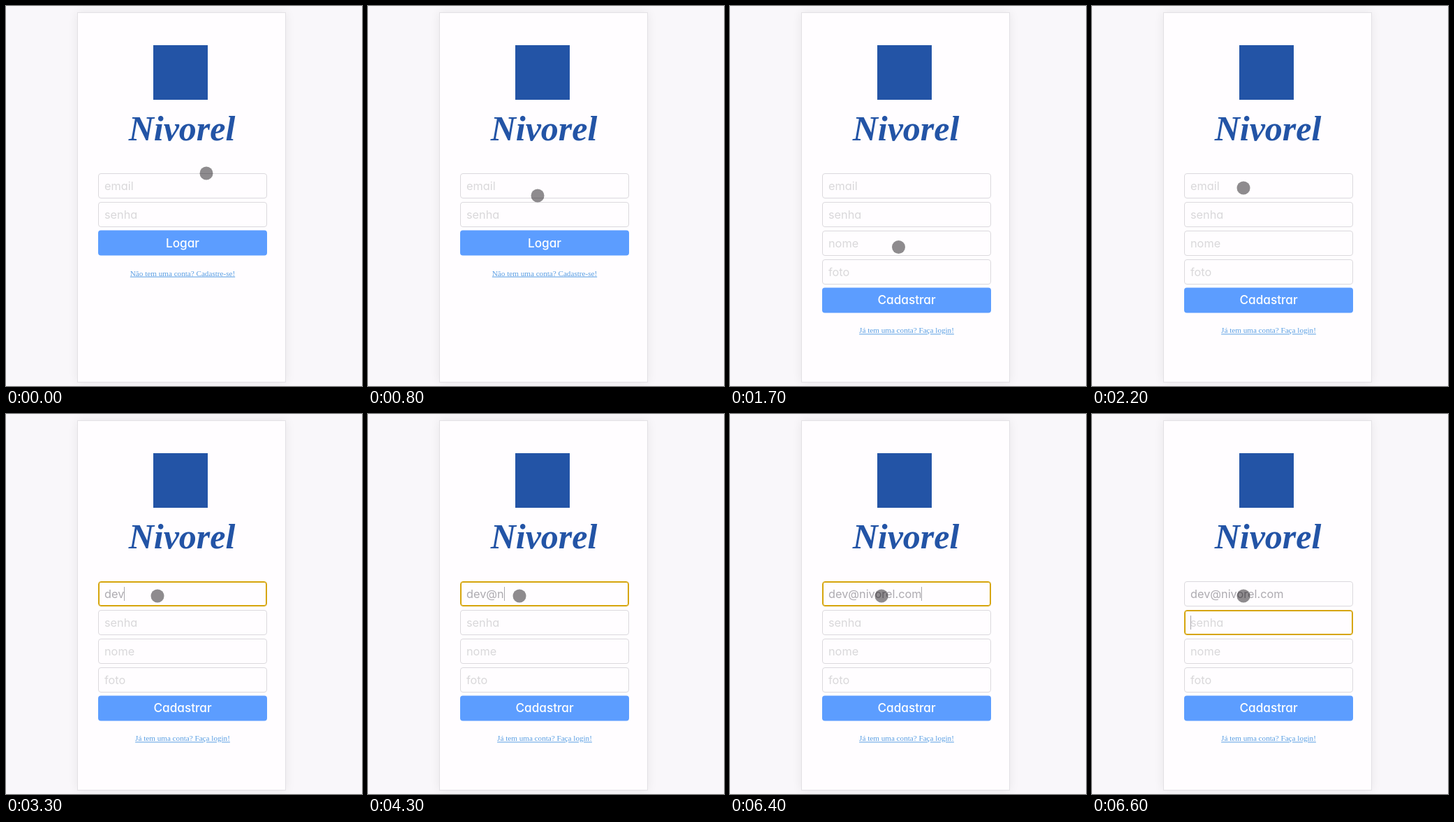
Write an HTML page that moves like this. It is 510 px wide and 543 px high and loops after 8 s.

```html
<!DOCTYPE html>
<html lang="pt-BR">
<head>
<meta charset="utf-8">
<title>Login</title>
<style>
  * { box-sizing: border-box; }
  html, body { margin: 0; width: 100%; height: 100%; overflow: hidden; background: #f9f7fa; }
  #stage { position: relative; width: 510px; height: 543px; overflow: hidden; background: #f9f7fa; }
  #stage div, #stage svg { position: absolute; }
  .card { left: 102px; top: 9px; width: 299px; height: 529px; background: #fffdff;
    border: 1px solid #e3e1e5; box-shadow: 0 0 14px rgba(0, 0, 0, .07); }
  .mark { left: 211px; top: 56px; width: 78px; height: 78px; background: #2354a6; }
  .brand { left: 102px; top: 145px; width: 300px; height: 60px; text-align: center; color: #2354a6;
    font: italic bold 50px/60px "Liberation Serif", serif; }
  .field, .button { left: 132px; width: 242px; height: 36px; border-radius: 4px; white-space: pre;
    font-family: Inter, "Open Sans", sans-serif; font-feature-settings: "cv11"; }
  .field { padding-left: 8px; border: 1px solid #dbd9dd; color: #d9d8da; font-size: 16.3px; line-height: 35px; }
  .field.typed { color: #adabb0; }
  .field.focus { border-color: #d6a50c; box-shadow: inset 0 0 0 1px #d6a50c; }
  .button { background: #5c9dff; color: #fff; text-align: center; font-weight: 500; font-size: 17.2px; line-height: 36px; }
  .link { left: 102px; width: 302px; height: 16px; text-align: center; color: #5a9fe3;
    text-decoration: underline; font: 11.15px/16px "Liberation Serif", serif; }
  #caret { width: 1px; height: 20px; background: #aaa8ad; }
  #touch { left: -10px; top: -10px; width: 19px; height: 19px; border-radius: 50%; background: rgba(4, 0, 4, .45); }
  #arrow { left: 247px; top: 382px; }
</style>
</head>
<body>
<div id="stage">
  <div class="card"></div>
  <div class="mark"></div>
  <div class="brand">Nivorel</div>
  <div id="form"></div>
  <div id="caret"></div>
  <div id="touch"></div>
  <svg id="arrow" width="13" height="22" viewBox="0 0 13 22">
    <path d="M1 1V16.4L4.3 13.3L6.8 19.4L9.2 18.4L6.8 12.5H11.2Z" fill="#252326" stroke="#fff" stroke-width=".9"/>
  </svg>
</div>
<script>
  const LOOP = 8000, ROW = 40.9, TOP = 238.8;
  const $ = id => document.getElementById(id);

  // Each row: start time, then the value held until the next row.
  const path = [
    [0, 287.5, 239.5], [400, 281, 244], [500, 266, 256], [600, 252, 265],
    [800, 243.5, 271.5], [900, 227.5, 304], [1000, 261.5, 362], [1100, 254.5, 384],
    [1300, 245.5, 384], [1700, 242, 345], [1800, 233.5, 297.5],
    [2000, 227, 282], [2100, 220, 267], [2200, 217.5, 260.5]
  ];
  const typing = [
    [0, ""], [3300, "dev"], [4100, "dev@"], [4300, "dev@n"], [4500, "dev@ni"],
    [4700, "dev@niv"], [5000, "dev@nivo"], [5100, "dev@nivor"], [5400, "dev@nivore"],
    [5500, "dev@nivorel"], [6200, "dev@nivorel."], [6400, "dev@nivorel.com"]
  ];
  const focus = [[0, -1], [2500, 0], [6600, 1]];
  const pages = [
    [0, { fields: ["email", "senha"], button: "Logar", link: "Não tem uma conta? Cadastre-se!" }],
    [1700, { fields: ["email", "senha", "nome", "foto"], button: "Cadastrar", link: "Já tem uma conta? Faça login!" }]
  ];

  const at = (rows, t) => rows.filter(row => row[0] <= t).pop();
  const pen = document.createElement("canvas").getContext("2d");
  pen.font = "16.3px Inter, 'Open Sans', sans-serif";

  function add(cls, y, text) {
    const el = document.createElement("div");
    el.className = cls;
    el.style.transform = `translateY(${y}px)`;
    el.textContent = text;
    $("form").append(el);
    return el;
  }

  function build(page, text, active) {
    $("form").textContent = "";
    page.fields.forEach((name, i) => {
      const el = add("field", Math.round(TOP + ROW * i), i === 0 && text || name);
      el.classList.toggle("typed", i === 0 && text !== "");
      el.classList.toggle("focus", i === active);
    });
    const y = TOP + ROW * page.fields.length;
    add("button", y, page.button);
    add("link", y + 53, page.link);
  }

  let last = "";
  function render(t) {
    const page = at(pages, t)[1], text = at(typing, t)[1], active = at(focus, t)[1];
    const state = page.button + text + active;
    if (state !== last) {
      build(page, text, active);
      const caret = $("caret").style;
      caret.display = active < 0 ? "none" : "";
      caret.left = 141 + (active === 0 ? pen.measureText(text).width : 0) + "px";
      caret.top = TOP + 8 + ROW * Math.max(active, 0) + "px";
      last = state;
    }
    const [, x, y] = at(path, t);
    const pointing = t >= 1600 && t < 1700;
    const hidden = t >= 3800 && t < 4000;
    $("touch").style.transform = `translate(${x}px, ${y}px)`;
    $("touch").style.display = pointing || hidden ? "none" : "";
    $("arrow").style.display = pointing ? "" : "none";
  }

  const start = performance.now();
  function tick() {
    render((performance.now() - start) % LOOP);
    requestAnimationFrame(tick);
  }
  tick();
</script>
</body>
</html>
```
